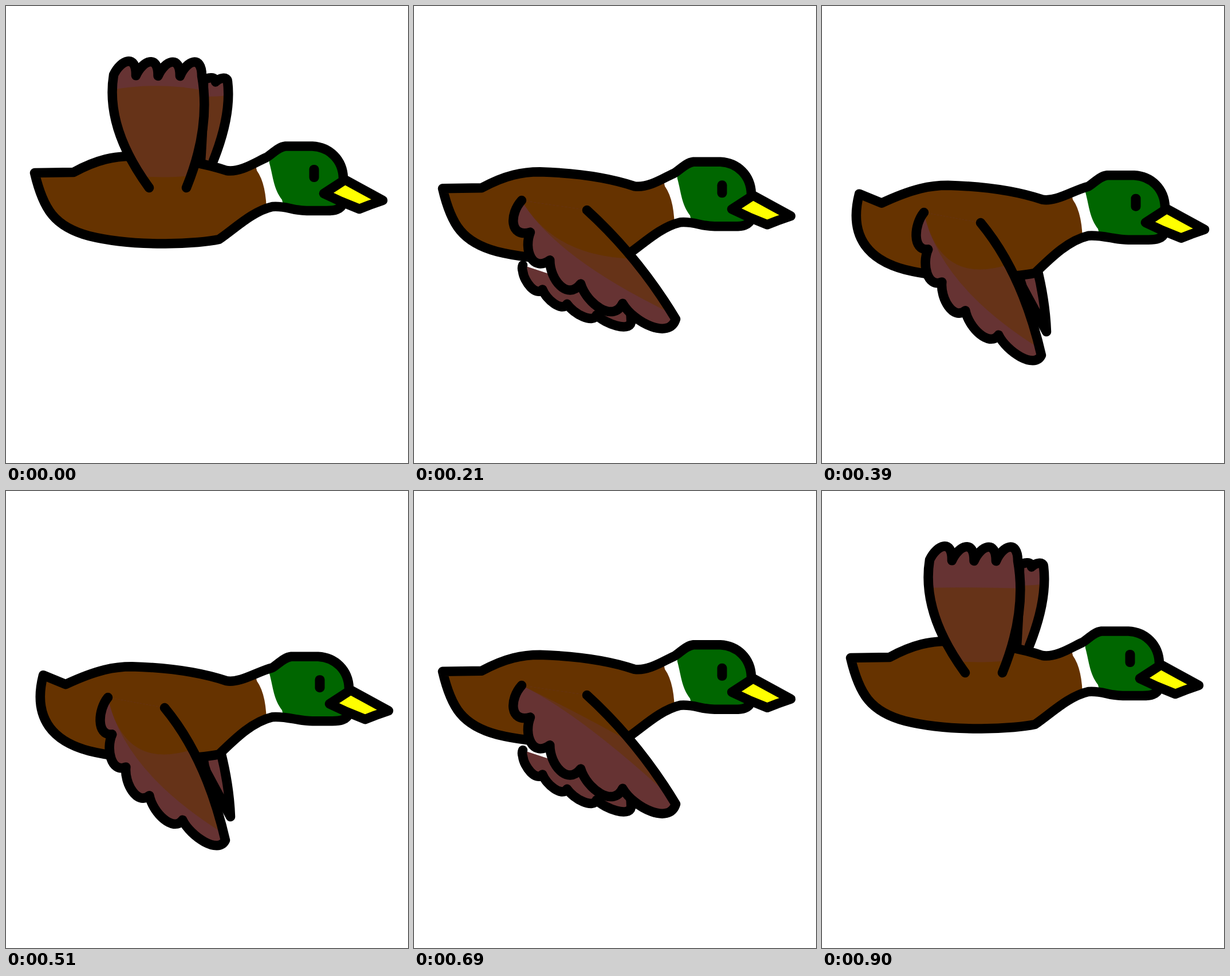
Recreate the animation shown at these times as an HTML page. Size 702 px wide and 797 px high, loop 930 ms.

```html
<!DOCTYPE html>
<html lang="en">
<head>
<meta charset="utf-8">
<title>Flying duck</title>
<style>
html, body { margin: 0; width: 100%; height: 100%; overflow: hidden; background: #fff; }
svg { display: block; width: 702px; height: 797px; }
.ink { fill: none; stroke: #000; stroke-width: 16.5; stroke-linecap: round; stroke-linejoin: round; }
</style>
</head>
<body>
<svg viewBox="0 0 702 797">
  <defs>
    <clipPath id="bodyClip"><path id="bodyShape"/></clipPath>
    <clipPath id="nearClip"><path id="nearShape"/></clipPath>
    <clipPath id="farClip"><path id="farShape"/></clipPath>
  </defs>
  <g clip-path="url(#farClip)">
    <rect width="702" height="797" fill="#633"/>
    <path id="farMid" fill="#663318"/>
  </g>
  <path id="farLine" class="ink"/>
  <g id="body">
    <g clip-path="url(#bodyClip)">
      <rect width="702" height="797" fill="#630"/>
      <path fill="#fff" d="M430 250L438 287Q456 312 455 370H500V250Z"/>
      <path fill="#060" d="M455 230L460 274C467 300 467 318 482 338L490 370H640V230Z"/>
    </g>
    <path id="bodyLine" class="ink"/>
    <g id="face">
      <rect x="529.5" y="277" width="17" height="30" rx="8"/>
      <path class="ink" style="fill:#ff0" d="M592 303L658 339L635 347L617 354L585 341L555 327Z"/>
    </g>
  </g>
  <g clip-path="url(#nearClip)">
    <rect width="702" height="797" fill="#633"/>
    <path id="nearMid" fill="#663318"/>
    <path id="nearRoot" fill="#630"/>
  </g>
  <path id="nearLine" class="ink"/>
</svg>
<script>
const STEP = 30, LOOP = 930;

// A wing runs along: rear root, bend, feather start, bend, tip, bend, front root.
// tips: paint line [distance from edge, sag] on the way down and on the way up.
const near = [
  { path: '250,317 173,212 188,120 266,123 342,122 358,212 315,317', feathers: 4, depth: -27, tips: [[.14, .1], [.26, .5]], root: [.9, 2] },
  { path: '193,333 230,175 346,178 352,210 378,240 353,296 287,340', feathers: 2, depth: 12, tips: [[.33, .6], [.29, .6]], root: [.8, 2] },
  { path: '188,339 188,339 188,339 201,487 457,546 392,438 302,356', feathers: 5, depth: 27, tips: [[.04, .5], [.04, 1]], root: [.52, .5] },
  { path: '178,360 178,360 178,360 175,530 383,609 350,466 277,378', feathers: 5, depth: 20, tips: [[.04, .35], [.04, .35]], root: [.63, .35] }
];
const far = [
  { path: '340,270 345,200 345,130 366,134 387,132 394,190 362,270', feathers: 2, depth: -7, tips: [[.2, .4], [.25, .5]] },
  { path: '320,300 335,250 362,210 420,203 425,262 415,278 345,300', feathers: 2, depth: 7, tips: [[.5, .5], [.5, .5]] },
  { path: '190,452 188,457 190,463 250,532 379,552 380,535 372,512', feathers: 4, depth: 12, tips: [] },
  { path: '345,470 346,480 350,490 365,545 392,568 390,515 375,455', feathers: 1, depth: 0, tips: [] }
];

const mix = (a, b, u) => [a[0] + (b[0] - a[0]) * u, a[1] + (b[1] - a[1]) * u];
const quad = (a, c, b, u) => mix(mix(a, c, u), mix(c, b, u), u);
const points = s => s.split(' ').map(p => p.split(',').map(Number));
const set = (id, d) => document.getElementById(id).setAttribute('d', d);
const move = (id, x, y) => document.getElementById(id).setAttribute('transform', `translate(${x} ${y})`);

// Feathers are equal scallops along a curved edge.
function wingLine({ feathers, depth }, [rear, bend, start, edge, tip, side, front]) {
  let d = `M${rear}Q${bend} ${start}`;
  for (let i = 0; i < feathers; i++) {
    const a = quad(start, edge, tip, i / feathers), b = quad(start, edge, tip, (i + 1) / feathers);
    const len = Math.hypot(b[0] - a[0], b[1] - a[1]);
    const out = (p, k) => [p[0] - (b[1] - a[1]) / len * depth * k, p[1] + (b[0] - a[0]) / len * depth * k];
    d += `C${out(mix(a, b, .3), 1)} ${out(b, 1.4)} ${b}`;
  }
  return d + `Q${side} ${front}`;
}

// Area between the roots and a line that follows the feather edge.
function patch([rear, bend, start, edge, tip, side, front], paint) {
  if (!paint) return '';
  const [dist, sag] = paint;
  const a = quad(start, bend, rear, dist), b = quad(tip, side, front, dist);
  return `M${a}Q${mix(edge, mix(bend, side, .5), sag)} ${b}L${side}L${front}L${rear}L${bend}Z`;
}

function drawWing(id, wing, rising) {
  const p = points(wing.path), line = wingLine(wing, p), tip = wing.tips[rising];
  set(id + 'Shape', line + 'Z');
  set(id + 'Line', line);
  set(id + 'Mid', patch(p, tip));
  if (wing.root) set(id + 'Root', patch(p, [wing.root[0], Math.max(wing.root[1], tip[1])]));
}

// k lifts the tail, pushes the head forward and fills out the belly.
function bodyLine(k) {
  const tail = `${50 + 15 * k} ${291 - 14 * k}`, x = 10 * k, y = 8 * k;
  return `M${tail}L${118 - 14 * k} ${290 + 3 * k}C160 267 190 262 220 262C290 264 340 272 385 287`
    + `C410 291 440 270 ${455 + x} 264C${465 + x} 258 ${475 + x} 246 ${488 + x} 244.5H${535 + x}`
    + `C${565 + x} 246 ${588 + x} 268 ${589 + x} 300V343C${585 + x} 356 ${572 + x} 357 ${560 + x} 357`
    + `H${525 + x}C${500 + x} 357 490 348 465 350C430 358 400 388 372 ${407 + y}`
    + `C340 ${414 + y} 230 ${422 + y} 145 ${401 + y}C85 ${385 + y} ${65 - 20 * k} 355 ${tail}Z`;
}

function draw(step) {
  const rising = +(step > 15);
  const pose = Math.min(3, Math.floor((18 - Math.abs(step - 15)) / 5));
  const k = pose % 2 ? (pose === 1 && rising ? .4 : 1) : 0;
  const line = bodyLine(k);
  set('bodyShape', line);
  set('bodyLine', line);
  move('face', 10 * k, 0);
  move('body', 0, Math.min(3.9 * step, 3.4 * (30 - step)));
  drawWing('near', near[pose], rising);
  drawWing('far', far[pose], rising);
}

function tick() {
  draw(Math.floor(performance.now() % LOOP / STEP));
  requestAnimationFrame(tick);
}
tick();
</script>
</body>
</html>
```
